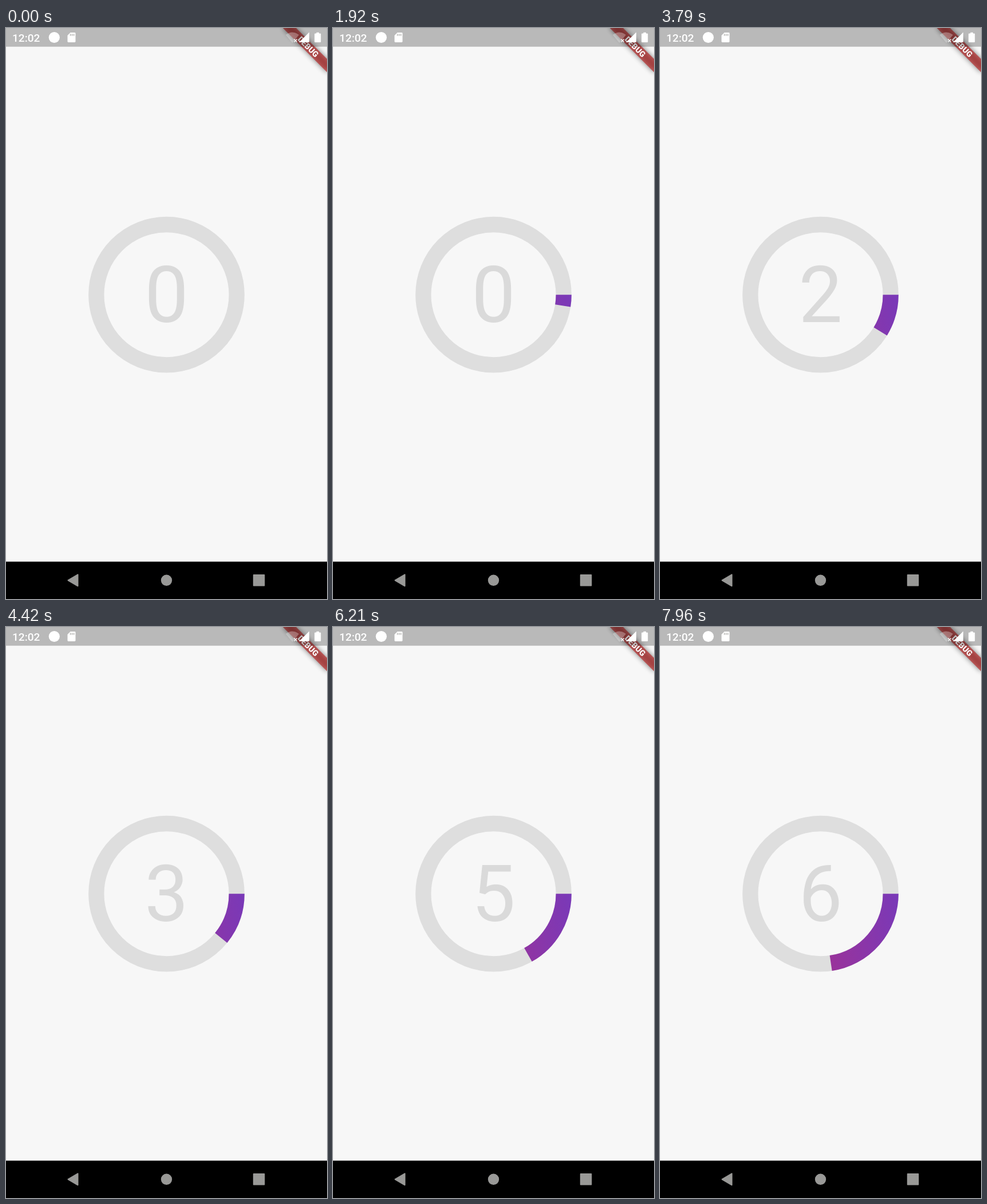
An HTML page for the animation above (8000 ms loop, 561 px wide and 998 px high).

```html
<!DOCTYPE html>
<html lang="en">
<head>
<meta charset="utf-8">
<title>Seconds ring</title>
<style>
  html, body { margin: 0; width: 100%; height: 100%; overflow: hidden; background: #f7f7f7; }
  svg { display: block; width: 100%; height: 100%; }
  text { font-family: Roboto, "Open Sans", sans-serif; }
</style>
</head>
<body>
<svg viewBox="0 0 561 998">
  <defs>
    <linearGradient id="purple" gradientUnits="userSpaceOnUse" x1="417" y1="466" x2="275" y2="494">
      <stop offset="0" stop-color="#7939b8"/>
      <stop offset="1" stop-color="#9a339a"/>
    </linearGradient>
    <filter id="soft" filterUnits="userSpaceOnUse" x="-90" y="0" width="180" height="100">
      <feGaussianBlur stdDeviation="5"/>
    </filter>
  </defs>
  <rect width="561" height="998" fill="#f7f7f7"/>

  <!-- ring and counter -->
  <g fill="none" stroke-width="27.3">
    <circle cx="280.5" cy="466.2" r="122.7" stroke="#dedede"/>
    <circle id="arc" cx="280.5" cy="466.2" r="122.7" stroke="url(#purple)" pathLength="360" stroke-dasharray="0 360"/>
  </g>
  <text id="count" x="280.5" y="513.5" font-size="136.4" text-anchor="middle" fill="#dadada">0</text>

  <!-- corner ribbon -->
  <g transform="translate(561 0) rotate(45)">
    <rect x="-54.5" y="38.2" width="109" height="16.4" fill="#000" opacity=".5" filter="url(#soft)"/>
    <rect x="-54.5" y="38.2" width="109" height="16.4" fill="#b71c1c" opacity=".627"/>
    <text y="51.3" font-size="13.9" font-weight="900" text-anchor="middle" fill="#fff">DEBUG</text>
  </g>

  <!-- status bar -->
  <rect width="561" height="32.7" opacity=".25"/>
  <g fill="#fff">
    <text x="11" y="23.6" font-size="19.1" font-weight="500">12:02</text>
    <circle cx="84.3" cy="16.5" r="9.6"/>
    <path d="M112.5 8h7.6q1.4 0 1.4 1.4v14.2q0 1.4-1.4 1.4h-11.2q-1.4 0-1.4-1.4V13z"/>
    <path d="M112.6 10.3v3.4M115.6 10.3v3.4M118.6 10.3v3.4" stroke="#b8b8b6" stroke-width="1.6"/>
    <path d="M489 12q11.500-9 23 0L500.500 26z" opacity=".3"/>
    <path d="M503.500 19.500l5 5m0-5l-5 5" stroke="#fff" stroke-width="1.500"/>
    <path d="M530 7.500V25H512z"/>
    <path d="M542.500 9.500V7.700h4.500v1.800h2q1.300 0 1.300 1.300v13q0 1.300-1.300 1.300h-8.500q-1.300 0-1.300-1.300v-13q0-1.300 1.300-1.300z"/>
  </g>

  <!-- navigation bar -->
  <rect y="932.7" width="561" height="66"/>
  <g fill="#999997" stroke="#999997" stroke-width="2" stroke-linejoin="round">
    <path d="M108.500 965.300L125.500 955.300V975.300z"/>
    <circle cx="280.5" cy="965.3" r="8.7"/>
    <rect x="432.8" y="956" width="18.500" height="18.500"/>
  </g>
</svg>
<script>
  const LOOP = 8000, START = 1168, FRAME = 1000 / 24;
  const arc = document.getElementById("arc");
  const count = document.getElementById("count");

  function draw(now) {
    const t = Math.floor((now % LOOP + 2) / FRAME) * FRAME;
    const seconds = Math.max(0, t - START) / 1000;
    arc.setAttribute("stroke-dasharray", `${seconds * 12} 360`);
    count.textContent = Math.floor(seconds);
  }

  const begin = performance.now();
  function tick() {
    draw(performance.now() - begin);
    requestAnimationFrame(tick);
  }
  tick();
</script>
</body>
</html>
```
